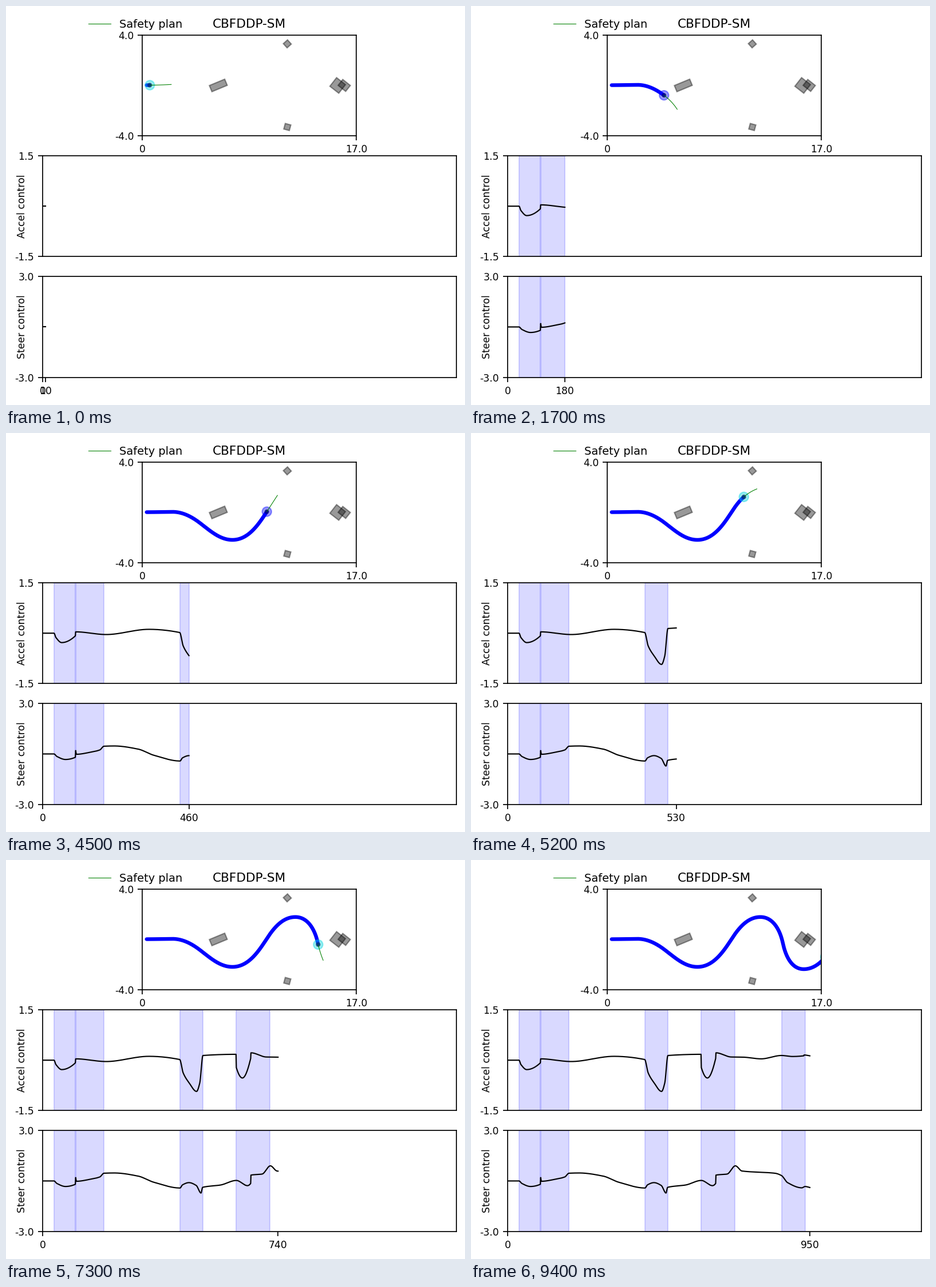
A matplotlib script for the animation above (9.5 s loop, 802 px wide and 698 px high).

```python
import numpy as np
import matplotlib.pyplot as plt
from matplotlib.animation import FuncAnimation
from matplotlib.patches import Circle, Rectangle

W, H = 802, 698
DPI = 72                      # one point is one pixel
FRAMES, INTERVAL = 95, 100
STEPS = FRAMES * 10
DT = 0.01
PT = 2.158                    # pixels per typographic point

plt.rcParams.update({
    "font.family": "DejaVu Sans",
    "axes.linewidth": 0.8 * PT,
    "axes.titlesize": 10 * PT, "axes.titlepad": 6 * PT,
    "axes.labelsize": 8 * PT, "axes.labelpad": -10 * PT,
})
for tick in ("xtick", "ytick"):
    plt.rcParams.update({
        f"{tick}.labelsize": 8 * PT,
        f"{tick}.major.size": 3.5 * PT,
        f"{tick}.major.pad": 3.5 * PT,
        f"{tick}.major.width": 0.8 * PT,
    })

# Turning points of the curves: step, value
ACCEL = [
    (0, 0), (36, 0), (42, -.13), (60, -.28), (103, -.08), (104, .04),
    (200, -.04), (334, .115), (431, .02), (442, -.38), (460, -.667),
    (484, -.93), (494, -.68), (504, .14), (608, .175), (609, -.22),
    (628, -.53), (654, .05), (655, .22), (703, .095), (740, .09),
    (797, .04), (861, .14), (895, .11), (931, .13), (932, .155), (950, .13),
]
STEER = [
    (0, 0), (36, 0), (45, -.15), (72, -.33), (103, -.2), (104, .2),
    (106, -.02), (150, .1), (180, .24), (193, .46), (225, .475), (300, .29),
    (350, -.08), (432, -.42), (440, -.23), (460, -.1), (483, -.27),
    (498, -.72), (503, -.38), (560, -.24), (609, .03), (644, -.28),
    (654, -.15), (655, .35), (690, .41), (716, .9), (737, .59), (840, .46),
    (861, .32), (880, -.1), (925, -.41), (935, -.33), (950, -.39),
]
PLAN_TURN = [
    (10, .05), (90, -.45), (180, -.35), (215, 0), (300, .5), (420, .45),
    (460, 0), (540, -.4), (620, -1.1), (720, -.1), (810, .9), (950, .2),
]
# x, y, heading in degrees
WAYPOINTS = [
    (.34, .02, 0), (2.4, .045, 0), (4.52, -.8, -37), (7.15, -2.18, 0),
    (9.89, .07, 57), (12.15, 1.78, 0), (13.93, -.27, -78), (15.6, -2.36, 0),
    (17.3, -1.4, 52),
]
ACTIVE = [(36, 103.5), (104.5, 193.5), (432, 504), (609, 715), (862, 935)]
# centre x, centre y, width, height, angle
OBSTACLES = [
    (6.03, 0, 1.32, .53, 22.5), (11.51, 3.3, .45, .45, 42),
    (11.51, -3.3, .46, .46, -15), (15.51, 0, .9, .87, -38),
    (16.03, 0, .77, .6, -38.5),
]


def blend(t, h, p0, p1, m0, m1):
    """Cubic Hermite curve from p0 to p1."""
    return ((1 + 2 * t) * (1 - t) ** 2 * p0 + t * (1 - t) ** 2 * h * m0
            + t * t * (3 - 2 * t) * p1 + t * t * (t - 1) * h * m1)


def smooth(x, keys):
    """Monotone curve through the keys, flat at each extreme."""
    xk, yk = np.array(keys, float).T
    d = np.diff(yk) / np.diff(xk)
    a, b = d[:-1], d[1:]
    same = a * b > 0
    mid = np.where(same, 2 * a * b / np.where(same, a + b, 1), 0)
    m = np.concatenate([d[:1], mid, d[-1:]])
    i = np.clip(np.searchsorted(xk, x, side="right") - 1, 0, len(xk) - 2)
    h = xk[i + 1] - xk[i]
    return blend((x - xk[i]) / h, h, yk[i], yk[i + 1], m[i], m[i + 1])


def road(points):
    """Dense curve through the waypoints, bending like arcs."""
    t = np.linspace(0, 1, 300)[:, None]
    parts = []
    for (x0, y0, a0), (x1, y1, a1) in zip(points, points[1:]):
        a0, a1 = np.radians([a0, a1])
        reach = np.hypot(x1 - x0, y1 - y0) / np.cos((a1 - a0) / 4) ** 2
        parts.append(blend(t, reach, np.array([x0, y0]), np.array([x1, y1]),
                           np.array([np.cos(a0), np.sin(a0)]),
                           np.array([np.cos(a1), np.sin(a1)])))
    return np.concatenate(parts).T


steps = np.arange(STEPS + 1)
accel = smooth(steps, ACCEL)
steer = smooth(steps, STEER)
turns = smooth(steps, PLAN_TURN)

# Drive along the road at the speed the acceleration gives.
speed = 2.5 + np.cumsum(accel) * DT
travel = np.concatenate([[0], np.cumsum(speed[:-1]) * DT])
curve = road(WAYPOINTS)
arc = np.concatenate([[0], np.cumsum(np.hypot(*np.diff(curve)))])
xs, ys = (np.interp(travel, arc, c) for c in curve)
heading = np.unwrap(np.arctan2(np.gradient(ys), np.gradient(xs)))
braking = 0.273 * speed ** 2

fig = plt.figure(figsize=(W / DPI, H / DPI), dpi=DPI, facecolor="white")


def panel(row, left, width, limit):
    height, top = 176.3, 50.8 + 211.25 * row
    ax = fig.add_axes([left / W, 1 - (top + height) / H, width / W, height / H])
    ax.set_ylim(-limit, limit)
    ax.set_yticks([-limit, limit], [f"-{limit}", f"{limit}"])
    ax.set_xticks([])
    return ax


world = panel(0, 238.3, 374, 4.0)
world.set_xlim(0, 17)
world.set_xticks([0, 17], ["0", "17.0"])
world.set_title("CBFDDP-SM")
fig.text(197.8 / W, 1 - 37.5 / H, "Safety plan", fontsize=9 * PT)
fig.add_artist(plt.Line2D([144 / W, 183 / W], [1 - 31 / H] * 2,
                          color="green", lw=0.5 * PT))

for cx, cy, w, h, angle in OBSTACLES:
    world.add_patch(Rectangle((cx - w / 2, cy - h / 2), w, h, angle=angle,
                              rotation_point="center", color="black",
                              alpha=.4, lw=PT))

track, = world.plot([], [], color="blue", lw=3 * PT, solid_capstyle="round")
halo = world.add_patch(Circle((0, 0), .37, alpha=.4, lw=PT, zorder=2.1))
core = world.add_patch(Circle((0, 0), .19, fc="black", ec="none", alpha=.4,
                              zorder=2.2))
plan, = world.plot([], [], color="green", lw=0.5 * PT, zorder=2.3)


def control_panel(row, limit, label):
    ax = panel(row, 63.9, 722.7, limit)
    ax.set_xlim(0, 1300)
    ax.set_ylabel(label)
    line, = ax.plot([], [], color="black", lw=PT)
    spans = [ax.add_patch(Rectangle((0, -limit), 0, 2 * limit, color="blue",
                                    alpha=.15, lw=PT)) for _ in ACTIVE]
    return ax, line, spans


accel_ax, accel_line, accel_spans = control_panel(1, 1.5, "Accel control")
steer_ax, steer_line, steer_spans = control_panel(2, 3.0, "Steer control")


def draw(frame):
    step = 10 * (frame + 1)
    seen = slice(0, step + 1)
    x, y = xs[step], ys[step]

    track.set_data(xs[seen], ys[seen])
    core.center = halo.center = x, y
    active = any(a <= step <= b for a, b in ACTIVE)
    halo.set_color("blue" if active else (0, .84, .88))

    n = 30
    angles = heading[step] + turns[step] * (np.arange(n) + .5) / n
    stride = braking[step] / n
    plan.set_data(x + np.append(0, np.cumsum(np.cos(angles))) * stride,
                  y + np.append(0, np.cumsum(np.sin(angles))) * stride)

    accel_line.set_data(steps[seen], accel[seen])
    steer_line.set_data(steps[seen], steer[seen])
    for spans in (accel_spans, steer_spans):
        for span, (a, b) in zip(spans, ACTIVE):
            span.set_visible(step >= a)
            span.set_x(a)
            span.set_width(max(0, min(b, step) - a))
    steer_ax.set_xticks([0, step], ["0", str(step)])


anim = FuncAnimation(fig, draw, frames=FRAMES, init_func=lambda: draw(0),
                     interval=INTERVAL, repeat=True, repeat_delay=0)
plt.show()
```
